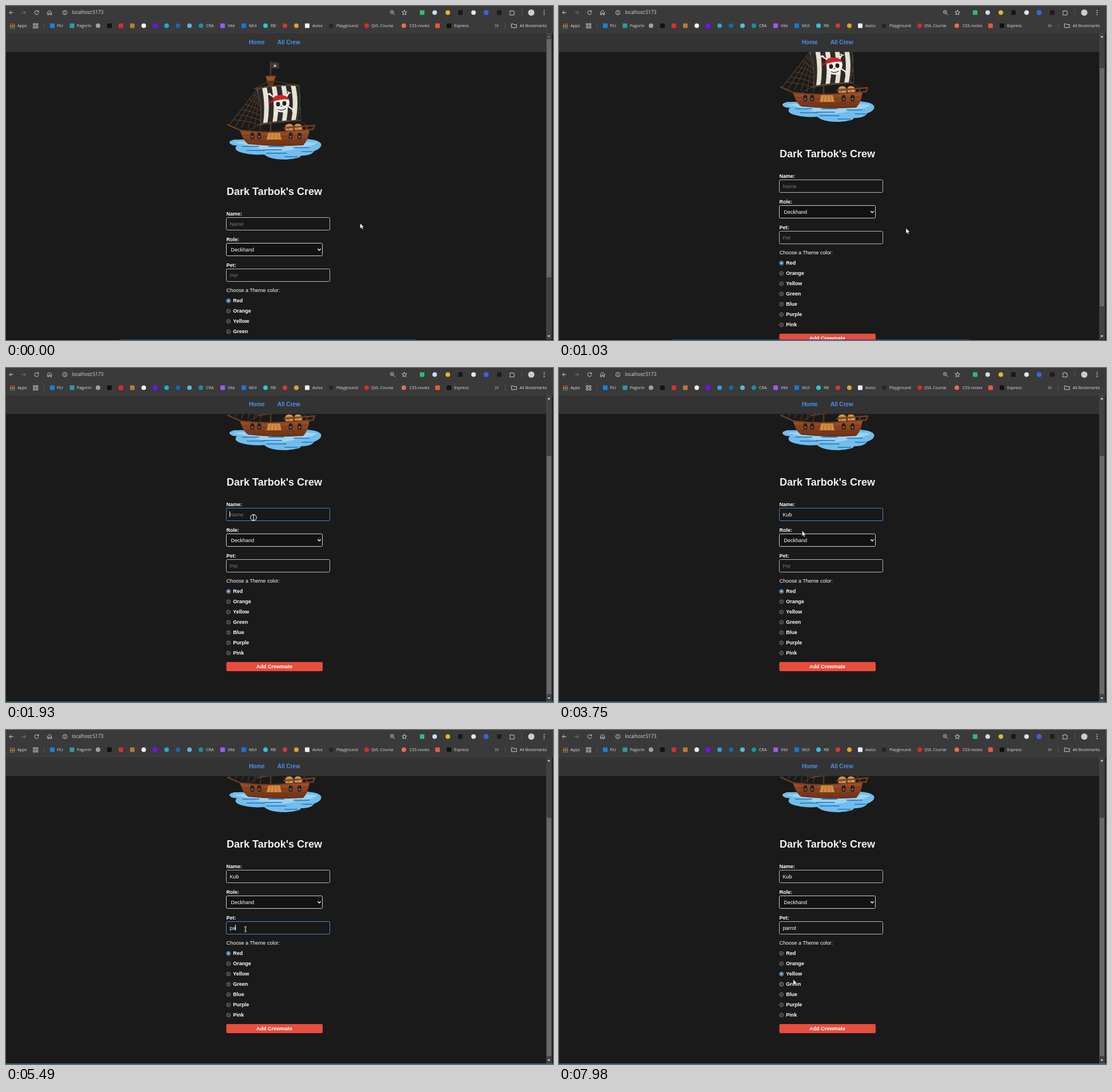
Recreate the animation shown at these times as an HTML page. Size 957 by 585 pixels, loop 8 s.

```html
<!DOCTYPE html>
<html lang="en">
<head>
<meta charset="utf-8">
<title>Crew form</title>
<style>
  html, body { margin: 0; width: 100%; height: 100%; overflow: hidden; background: #1a1a1a; }
  svg { display: block; }
  text { white-space: pre; }
  .chrome text { font: 7.15px "Open Sans", sans-serif; fill: #dedede; }
  .chrome .url { font-size: 8.15px; }
  .icon { fill: none; stroke: #d0d0d0; stroke-width: 1; }
  .page text { font: 9px "Liberation Sans", Arial, sans-serif; fill: #fff; }
  .page .bold { font-weight: bold; }
  .page .title { font-size: 18px; font-weight: bold; fill: #f2f2f7; }
  .page .hint { fill: #757575; }
  .nav text { font: bold 10px "Liberation Sans", Arial, sans-serif; fill: #4a90ee; }
  .box { fill: #181818; stroke: #b8b8b8; }
  .select { fill: #121212; stroke: #d4d4d4; }
  .box.focus { stroke: #4b82cc; filter: drop-shadow(0 0 .6px #2f6fd0); }
  .ring { fill: #3b3b3b; stroke: #757575; stroke-width: .9; }
  .hover .ring { stroke: #aaa; }
  .dot { fill: #99c8ff; visibility: hidden; }
  .on .ring { fill: #1f2a35; stroke: #99c8ff; }
  .on .dot { visibility: visible; }
</style>
</head>
<body>
<svg width="957" height="585" viewBox="0 0 957 585">
  <defs>
    <clipPath id="sailClip"><path id="sailShape" d="M439 146Q476 137 513 140Q517 172 510 200Q478 200 445 206Q449 174 439 146Z"/></clipPath>
    <linearGradient id="wood" x2="0" y2="1"><stop stop-color="#a4532a"/><stop offset="1" stop-color="#6c3015"/></linearGradient>
  </defs>
  <rect width="957" height="585" fill="#1a1a1a"/>

  <g class="page" id="page">
    <g id="ship" stroke-linecap="round" stroke-linejoin="round">
      <path d="M399 234Q388 237 392 241Q397 245 404 244Q398 251 407 255Q425 262 452 260Q461 269 490 269Q516 267 516 262Q535 262 539 254Q554 249 551 241Q547 234 524 233Z" fill="#72bdea"/>
      <path d="M397 239Q440 233 545 239Q536 247 510 248Q492 258 452 253Q432 245 397 239Z" fill="#9bd3f3"/>
      <path d="M414 246h28m-20 7h30m8-7h26m-36 6h32m-26 6h34m14-10h26m-12 7h18m-48 9h22" fill="none" stroke="#3486c9" stroke-width="2"/>
      <g id="rigging" fill="none" stroke="#4b3729" stroke-width="1.4"></g>
      <path d="M463 98V221" stroke="#553524" stroke-width="2.6"/>
      <path d="M464 99Q471 97 478 100V110Q471 108 464 110Z" fill="#3a3638"/>
      <path d="M468 102l5 5m0-5l-5 5" stroke="#999" stroke-width=".8"/><circle cx="470.5" cy="104.5" r="1.9" fill="#ddd"/><path d="M468.8 103h3.4" stroke="#b3272b" stroke-width="1.2"/>
      <path d="M456 129h14l-3 14h-8z" fill="#5f341b"/>
      <path d="M454 122h18l-3 9h-12z" fill="#945328"/><path d="M453.5 122.5h19M459 132h9" stroke="#5f3317" stroke-width="1.6"/>
      <path d="M461 131L436 144M466 131L510 139" stroke="#5b4030"/>
      <use href="#sailShape" fill="#e8e2d2"/>
      <g clip-path="url(#sailClip)"><g id="stripes" fill="none" stroke="#2c2a2b" stroke-width="8.6"></g></g>
      <path d="M460 154L503 182M495 152L471 190" stroke="#f2eee4" stroke-width="2.4"/>
      <path d="M458 156l2-3 3 1M493 150l2 2 3 0M501 184l2-3 2 0M469 188l2 2 3 0" fill="none" stroke="#f2eee4" stroke-width="1.7"/>
      <path d="M468 166Q482 158 495 164Q498 174 491 179L490 185Q480 188 474 184L473 180Q467 175 468 166Z" fill="#f5f2ea"/>
      <path d="M466 167Q467 156 480 156Q492 156 496 164Q482 162 466 168Z" fill="#cf2524"/><path d="M467 165Q457 166 460 171L467 168Z" fill="#a81d1d"/>
      <ellipse cx="476" cy="172" rx="3.5" ry="4" fill="#242224"/><ellipse cx="487" cy="170.5" rx="3.5" ry="4" fill="#242224"/>
      <path d="M481 176l2-1M476 181Q483 184 489 180" fill="none" stroke="#242224" stroke-width="1.2"/>
      <path d="M435 145Q475 137 512 139M441 208Q480 202 515 200" fill="none" stroke="#5e3f2a" stroke-width="2.2"/>
      <path d="M513 140L516 200M447 206L424 218M513 201L530 212" stroke="#54402f"/>
      <g fill="#d29755" stroke="#70421f" stroke-width=".8"><path d="M489 218Q485 207 496 206Q505 207 503 218Z"/><path d="M505 217Q502 206 511 206Q520 207 518 217Z"/><path d="M488 211h15m2 0h13"/></g>
      <path d="M409 217Q450 223 490 220L531 216Q529 235 520 244Q470 247 424 242Q416 238 409 217Z" fill="url(#wood)"/>
      <path d="M413 226Q470 232 528 225M416 234Q470 239 525 234" fill="none" stroke="#6b3218" stroke-width=".9"/>
      <path d="M388 208L411 218Q450 223 487 220L538 216M486 214L540 209L537 216" fill="none" stroke="#74401f" stroke-width="2.3"/>
      <path d="M494 214v6m8-7v6m8-7v6m8-6v5m8-5v4" stroke="#94592c" stroke-width="1.3"/>
      <path d="M459 222h20l3 12h-26z" fill="#d58b40"/><path d="M464 223l-2 11m7-11v11m5-11l2 11" stroke="#98592a" stroke-width=".8"/>
      <g id="ports"></g>
    </g>

    <text class="title" x="386" y="331">Dark Tarbok's Crew</text>
    <text class="bold" x="385.5" y="367">Name:</text>
    <rect class="box" id="nameBox" x="385.5" y="370.5" width="181" height="22" rx="2"/>
    <text id="nameText" x="391.5" y="385"></text>
    <text class="bold" x="385.5" y="412">Role:</text>
    <rect class="select" x="385.5" y="415.5" width="168" height="22" rx="2"/>
    <text x="393.4" y="430">Deckhand</text>
    <path d="M545.3 425.3l2.7 2.7 2.7-2.7" fill="none" stroke="#fff" stroke-width="1.4"/>
    <text class="bold" x="385.5" y="457">Pet:</text>
    <rect class="box" id="petBox" x="385.5" y="460.5" width="181" height="22" rx="2"/>
    <text id="petText" x="391.5" y="475"></text>
    <rect id="caret" width="1" height="10" fill="#fff"/>
    <text x="385.5" y="501">Choose a Theme color:</text>
    <g id="radios"></g>
    <rect x="385.5" y="640" width="168.5" height="16" rx="2" fill="#e84c3d"/>
    <text class="bold" x="469.6" y="651" text-anchor="middle">Add Crewmate</text>
  </g>

  <g class="nav">
    <rect y="47" width="945" height="33.5" fill="#333"/>
    <text x="424.9" y="67">Home</text><text x="474.7" y="67">All Crew</text>
  </g>

  <rect x="945" y="47" width="10" height="538" fill="#424242"/>
  <rect id="thumb" x="946" width="8" height="417" fill="#686868"/>
  <path id="up" d="M947.5 55l2.3-3 2.3 3z"/>
  <path d="M947.5 577l2.3 3 2.3-3z" fill="#e8e8e8"/>
  <rect x="955" y="47" width="2" height="538" fill="#15202c"/>
  <rect y="584" width="957" height="1" fill="#151515"/>
  <rect id="edge" y="584" height="1"/>

  <g class="chrome">
    <rect width="957" height="47" fill="#3a3a3a"/>
    <path d="M0 47h957" stroke="#464646" stroke-width=".6"/>
    <text class="url" x="115.5" y="14">localhost:5173</text>
    <g class="icon">
      <path d="M12.7 11.5H6m3.2-3.3L6 11.5l3.2 3.3"/>
      <path d="M27.5 11.5h6.7M31 8.2l3.2 3.3-3.2 3.3" stroke="#777"/>
      <path d="M56.6 9.7a3.5 3.5 0 1 0 .4 2.6M57 7.8v2.4h-2.5"/>
      <path d="M72.8 15.2v-4.7l3.4-2.8 3.4 2.8v4.7h-2.2v-2.7h-2.4v2.7z"/>
      <circle cx="103" cy="11.5" r="3.7"/><path d="M103 11v2.5m0-4.3v1"/>
      <circle cx="675.3" cy="10.5" r="2.8"/><path d="M677.5 12.7l3 3M674 10.5h2.6"/>
      <path d="M697 7.2l1.2 2.8 3 .3-2.3 2 .7 3-2.6-1.6-2.6 1.6.7-3-2.3-2 3-.3z"/>
      <path d="M881.5 9h2.5q.8-3 2.2 0h2.6v2.6q2.8 1 0 2.2v2h-7.3v-2.3q2-1.1 0-2.2z"/>
      <path d="M855.8 32.2l2.2 2.3-2.2 2.3m3.4-4.6l2.2 2.3-2.2 2.3"/>
      <path d="M884.3 31.3h3l1.2 1.2h4.6v5.3h-8.8z"/>
      <path d="M47.8 30.8h3v3h-3zm5 0h3v3h-3zm-5 5h3v3h-3zm5 0h3v3h-3z"/>
      <path d="M67 29v11M873.5 29v11M902.5 5v12" stroke="#5c5c5c" stroke-width=".8"/>
    </g>
    <g id="bar"></g>
  </g>

  <path id="arrow" d="M0 0V9.6L2.2 7.6L3.7 11L5.3 10.3L3.9 7H7Z" fill="#fff" stroke="#111" stroke-width=".6"/>
  <g id="beam" fill="none" stroke="#fff" stroke-width="1">
    <path d="M-2 -4.3h1.5l.5.5.5-.5H2M0 -3.8V3.8M-2 4.3h1.5l.5-.5.5.5H2"/>
    <circle id="click" r="5.3"/>
  </g>
</svg>
<script>
const $ = id => document.getElementById(id);
const add = (id, markup) => $(id).insertAdjacentHTML('beforeend', markup);

// Toolbar and bookmark marks: x, color, optional label with its x
const square = (x, y, color) => add('bar', `<rect x="${x - 4}" y="${y - 4}" width="8" height="8" rx="1" fill="${color}"/>`);
const disc = (x, y, color, r = 4) => add('bar', `<circle cx="${x}" cy="${y}" r="${r}" fill="${color}"/>`);
const label = (x, text) => add('bar', `<text x="${x}" y="37">${text}</text>`);

[[81, '#1685d9', 'FIU', 89], [115.5, '#2b9da2', 'Pagorin', 124], [181, '#111'], [201, '#d62f2f'], [221, '#b87a3a'],
 [261, '#7012f5'], [379, '#9a5cf5', 'Vite', 388], [416, '#1976d2', 'MUI', 425], [527, '#f2f0fa', 'Axios', 536],
 [755, '#e65b38'], [775, '#111', 'Express', 784]]
  .forEach(([x, color, text, tx]) => { square(x, 34.5, color); if (text) label(tx, text); });
[[161, '#a0a0a0'], [241, '#f2f2f2'], [281, '#25a9d5'], [301, '#1669ad'], [321, '#58b9d7'], [341, '#13949d', 'CRA', 350],
 [454, '#36bfd9', 'RB', 463], [488, '#d6363a'], [508, '#e2a02d'], [569, '#252525', 'Playground', 578],
 [631, '#d92c2c', 'QVL Course', 639], [696, '#ef6b4a', 'CSS-nooks', 706]]
  .forEach(([x, color, text, tx]) => { disc(x, 34.5, color); if (text) label(tx, text); });
label(20, 'Apps');
label(898.7, 'All Bookmarks');
['#e85045', '#f1b82d', '#45a85a'].forEach((color, row) => {
  for (let col = 0; col < 3; col++)
    add('bar', `<rect x="${7 + col * 3.2}" y="${31 + row * 3.2}" width="2" height="2" fill="${color}"/>`);
});
square(728, 11.5, '#2fbd73');
disc(750, 11.5, '#c9dcf0');
disc(773, 11.5, '#e6b62f');
square(795, 11.5, '#171717');
disc(818, 11.5, '#e5e5e5');
disc(840, 11.5, '#3d62d9', 4.5);
square(863, 11.5, '#201b1a');
disc(919, 11.5, '#d5c8cb', 5.5);
[8, 11.5, 15].forEach(y => disc(941.5, y, '#ddd', .9));

// Ship details
for (let i = 0; i < 6; i++) {
  const foot = 390 + i * 11;
  add('rigging', `<path d="M${440 + i} ${145 + i * 3}L${foot} ${209 + i * 1.8}"/>`);
}
for (let i = 1; i < 7; i++) {
  const k = i / 7;
  add('rigging', `<path d="M${440 - 50 * k} ${145 + 63 * k}Q${443 - 18 * k} ${152 + 58 * k} ${446 + 2 * k} ${160 + 58 * k}"/>`);
}
for (let i = 0; i < 5; i++) {
  const x = 443 + i * 17;
  add('stripes', `<path d="M${x - 1} 136Q${x + 8} 172 ${x + 2 - i} 210"/>`);
}
for (const x of [431, 443, 498, 513.5])
  add('ports', `<rect x="${x - 3.3}" y="222" width="6.6" height="11" rx="2.5" fill="#28211f"/><circle cx="${x}" cy="229" r="1.7" fill="#777"/>`);

// Theme choices
const radios = ['Red', 'Orange', 'Yellow', 'Green', 'Blue', 'Purple', 'Pink'].map((name, i) => {
  const y = 516 + i * 18;
  add('radios', `<g><circle class="ring" cx="389.2" cy="${y + .3}" r="3.4"/><circle class="dot" cx="389.2" cy="${y + .3}" r="2"/><text class="bold" x="397.2" y="${y + 3}">${name}</text></g>`);
  return $('radios').lastElementChild;
});

// Pointer: time, x, y, shape
const pointer = [
  [0, 619.5, 380.5], [120, 620, 382], [240, 620.5, 383], [640, 618.5, 386], [760, 616.3, 387.5],
  [910, 610, 389], [1030, 607, 389], [1420, 594, 380], [1540, 560, 352], [1660, 510, 312], [1780, 465, 282],
  [1930, 433, 262, 'click'], [2050, 433, 262, 'beam'], [3750, 425.3, 285], [3870, 425, 298],
  [4150, 421, 325], [4270, 419, 349, 'beam'], [4420, 419, 349, 'click'], [4540, 419, 349, 'beam'],
  [6660, 419, 354], [6780, 419, 361], [6930, 427, 392], [7050, 423, 433], [7170, 416, 427],
  [7320, 411, 426], [7440, 404, 425], [7560, 400, 424], [7680, 402, 425], [7830, 406.5, 430], [7980, 409.7, 437]
];
const scroll = [[0, 0], [910, 28], [1030, 66], [1180, 95], [1300, 115], [1420, 125]];
const crewName = [[0, ''], [2980, 'K'], [3100, 'Ku'], [3220, 'Kub']];
const pet = [[0, ''], [5180, 'p'], [5490, 'pa'], [5610, 'par'], [5860, 'parr'], [6010, 'parro'], [6130, 'parrot']];
const focus = [[0, ''], [1930, 'name'], [4420, 'pet'], [7560, '']];
const blink = [[0, 0], [1930, 1], [2450, 0], [2980, 1], [3750, 0], [4270, 1], [5060, 0], [5180, 1], [6660, 0], [7170, 1]];
const hovered = [[0, -1], [7050, 2], [7830, 3]];

const at = (track, t) => track.findLast(step => step[0] <= t);
const show = (node, on) => node.setAttribute('visibility', on ? 'inherit' : 'hidden');

function setField(id, value, hint, focused) {
  const text = $(id + 'Text');
  text.textContent = value || hint;
  text.classList.toggle('hint', !value);
  $(id + 'Box').classList.toggle('focus', focused);
}

function draw(t) {
  const top = at(scroll, t)[1], active = at(focus, t)[1];
  $('page').setAttribute('transform', `translate(0 ${-top})`);
  $('thumb').setAttribute('y', Math.round(58 + top * .77));
  $('up').setAttribute('fill', top ? '#e8e8e8' : '#777');

  const name = at(crewName, t)[1], petName = at(pet, t)[1];
  setField('name', name, 'Name', active === 'name');
  setField('pet', petName, 'Pet', active === 'pet');
  const typed = active === 'pet' ? petName : name;
  const width = typed ? $(active === 'pet' ? 'petText' : 'nameText').getComputedTextLength() : 0;
  $('caret').setAttribute('x', Math.floor(391.5 + width));
  $('caret').setAttribute('y', active === 'pet' ? 466 : 376);
  show($('caret'), active && at(blink, t)[1]);

  const chosen = t < 7560 ? 0 : 2, over = at(hovered, t)[1];
  radios.forEach((radio, i) => {
    radio.classList.toggle('on', i === chosen);
    radio.classList.toggle('hover', i === over);
  });

  const lit = t >= 1930;
  $('edge').setAttribute('x', lit ? 0 : 198);
  $('edge').setAttribute('width', lit ? 957 : 520);
  $('edge').setAttribute('fill', lit ? '#1679ad' : '#174a91');

  const [, x, y, shape] = at(pointer, t);
  for (const id of ['arrow', 'beam']) $(id).setAttribute('transform', `translate(${x} ${y})`);
  show($('arrow'), !shape);
  show($('beam'), shape);
  show($('click'), shape === 'click');
}

function tick() {
  draw(performance.now() % 8000);
  requestAnimationFrame(tick);
}
tick();
</script>
</body>
</html>
```
